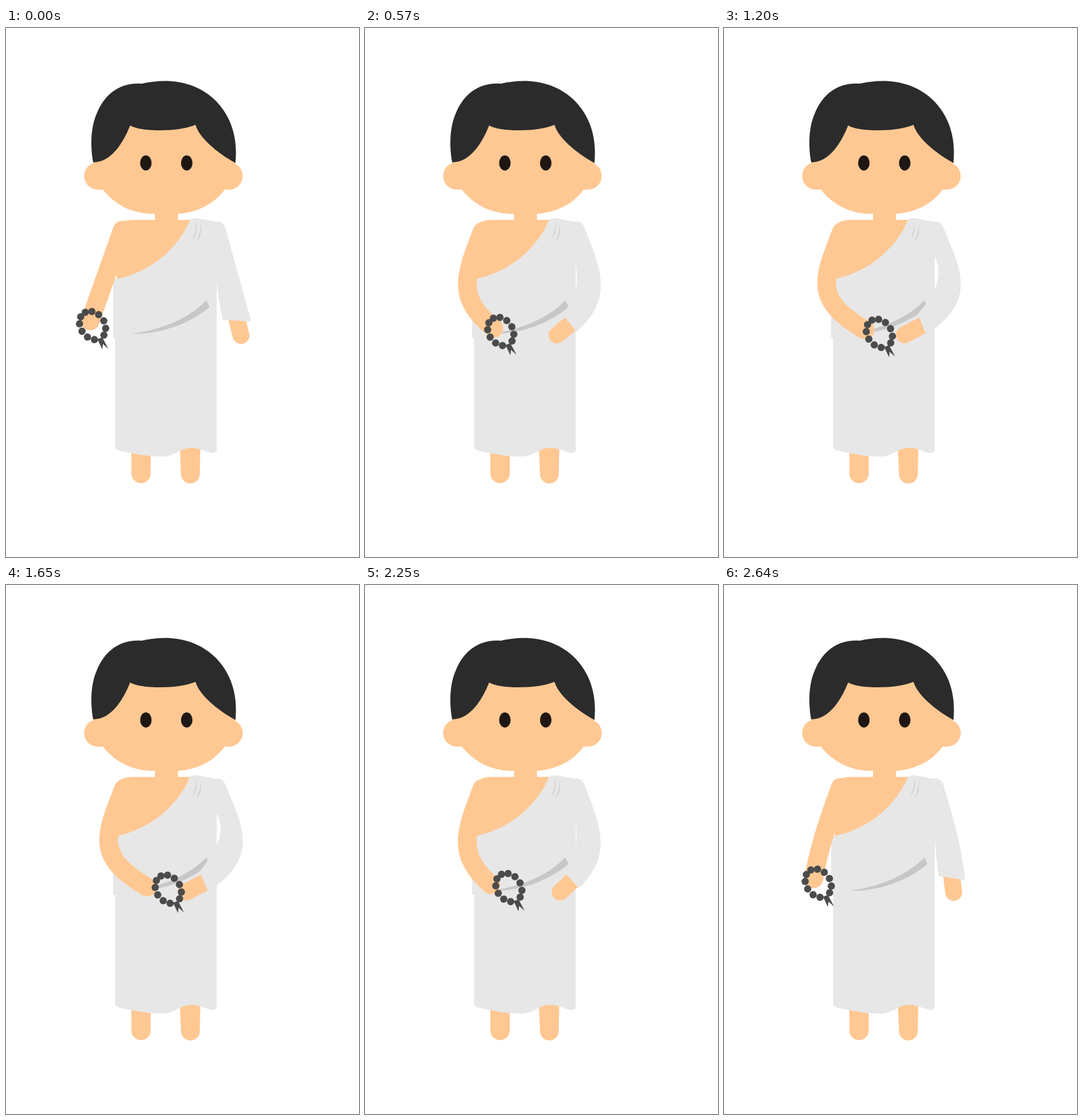
Write an HTML page with a canvas that moves like this. It is 583 px wide and 874 px high and loops after 2670 ms.

```html
<!DOCTYPE html>
<html lang="en">
<head>
<meta charset="utf-8">
<title>Beads</title>
<style>
html, body { margin: 0; width: 100%; height: 100%; overflow: hidden; background: #fff; }
canvas { display: block; }
</style>
</head>
<body>
<canvas id="stage" width="583" height="874"></canvas>
<script>
const ctx = document.getElementById('stage').getContext('2d');
const LOOP = 2670, STEP = 30, REST = 2700;
const SKIN = '#ffc893', CLOTH = '#e7e7e7', FOLD = '#c7c7c7', HAIR = '#2b2b2b', EYE = '#1f1713', BEAD = '#4b4b4b';

const LEGS = new Path2D('M207 690V736A16 16 0 0 0 239 736V690Z M287 690L289 737A15.5 15.5 0 0 0 320 737L321 690Z');
const TORSO = new Path2D('M246 298H284V317H310V420H183L181 332Q185 318 208 317H246Z');
const ROBE = new Path2D('M304 317Q308 313 320 315L345 320Q358 318 362 329L348 380V699Q343 704 335 701' +
  'C318 695 306 690 288 698Q272 708 258 708C236 708 207 703 186 698Q180 696 180 690V512H177V415' +
  'L182 415C243 402 285 362 304 317Z');
const BAND = new Path2D('M207 505C250 500 299 483 331 450L336 461C301 491 250 507 207 505Z');
const PLEATS = new Path2D('M315 319Q314 338 308 348Q316 340 315 319Z M322 323Q321 341 315 352Q323 344 322 323Z');
const FACE = new Path2D('M144 222L151 267H160C181 293 208 306 240 307H285' +
  'C313 305 342 293 361 267H369L379 222L313 150H205Z');
const HAIR_CAP = new Path2D('M144 222C139 194 140 163 150 141C162 111 187 89 224 92C268 82 311 88 343 117' +
  'C373 145 383 183 379 223C348 206 319 181 313 160Q290 169 255 169Q219 169 205 161C194 189 174 222 144 222Z');
const TASSEL = new Path2D('M151 514L159 511L169 530L160 522L159 531Z');

const clamp = v => Math.max(0, Math.min(1, v));
// Blends two poses of equal length: arm hanging (k = 0) and arm folded (k = 1).
const mix = (hanging, folded, k) => hanging.map((v, i) => v + (folded[i] - v) * k);

function fill(path, color) {
  ctx.fillStyle = color;
  ctx.fill(path);
}

function ellipse(x, y, rx, ry, color) {
  ctx.beginPath();
  ctx.ellipse(x, y, rx, ry, 0, 0, Math.PI * 2);
  ctx.fillStyle = color;
  ctx.fill();
}

function limb(from, bend, to, width) {
  ctx.beginPath();
  ctx.moveTo(...from);
  ctx.bezierCurveTo(...bend, ...to);
  ctx.strokeStyle = SKIN;
  ctx.lineWidth = width;
  ctx.lineCap = 'round';
  ctx.stroke();
}

function drawBody() {
  fill(LEGS, SKIN);
  fill(TORSO, SKIN);
  fill(ROBE, CLOTH);
  fill(BAND, FOLD);
  fill(PLEATS, FOLD);
}

function drawHead() {
  for (const x of [151.5, 368.5]) ellipse(x, 244.5, 22.5, 22.5, SKIN);
  fill(FACE, SKIN);
  fill(HAIR_CAP, HAIR);
  for (const x of [231, 298.5]) ellipse(x, 223, 9.5, 12.5, EYE);
}

function drawBareArm(reach) {
  const shoulder = mix([192, 334], [194, 337], reach);
  const bend = mix([174, 384, 157, 434], [162, 418, 149, 449], reach);
  const palm = mix([139, 484], [233, 499], reach);
  limb(shoulder, bend, palm, 31);
}

function drawSleevedArm(reach) {
  const wrist = mix([380, 475], [334, 488], reach);
  const palm = mix([388, 508], [298, 507], reach);
  limb(wrist, [...wrist, ...palm], palm, 28);

  // The inner elbow opens only near the end of the fold.
  const outer = mix([376, 381, 391, 433, 405, 485], [394, 405, 417, 450, 334, 507], reach);
  const cuff = mix([358, 482], [320, 473], reach);
  const inner = mix([351, 450, 348, 430], [345, 443, 368, 408], reach ** 4);
  ctx.beginPath();
  ctx.moveTo(362, 329);
  ctx.bezierCurveTo(...outer);
  ctx.lineTo(...cuff);
  ctx.bezierCurveTo(...inner, 345, 372);
  ctx.closePath();
  ctx.fillStyle = CLOTH;
  ctx.fill();
}

function drawBeads(t) {
  const rise = clamp(t / 780), settle = clamp((t - 1110) / 490), back = clamp((REST - t) / 595);
  ctx.save();
  ctx.translate(back * (111 * rise + 14 * settle), back * (13.4 * rise - 2.4 * settle));
  fill(TASSEL, BEAD);
  // Eleven beads on a tilted oval, with a gap for the tassel.
  ctx.translate(143, 491.5);
  ctx.rotate(55 * Math.PI / 180);
  for (let i = 0; i < 11; i++) {
    const angle = (33.5 + 30.8 * i) * Math.PI / 180;
    ellipse(25 * Math.cos(angle), 19.8 * Math.sin(angle), 6, 6, BEAD);
  }
  ctx.restore();
}

function draw(t) {
  const reach = Math.min(1, t / 725, (REST - t) / 617);
  ctx.fillStyle = '#fff';
  ctx.fillRect(0, 0, 583, 874);
  drawBody();
  drawHead();
  drawSleevedArm(reach);
  drawBareArm(reach);
  drawBeads(t);
}

let start;
function tick(now) {
  start ??= now;
  draw(Math.floor(((now - start) % LOOP) / STEP) * STEP);
  requestAnimationFrame(tick);
}
draw(0);
requestAnimationFrame(tick);
</script>
</body>
</html>
```
